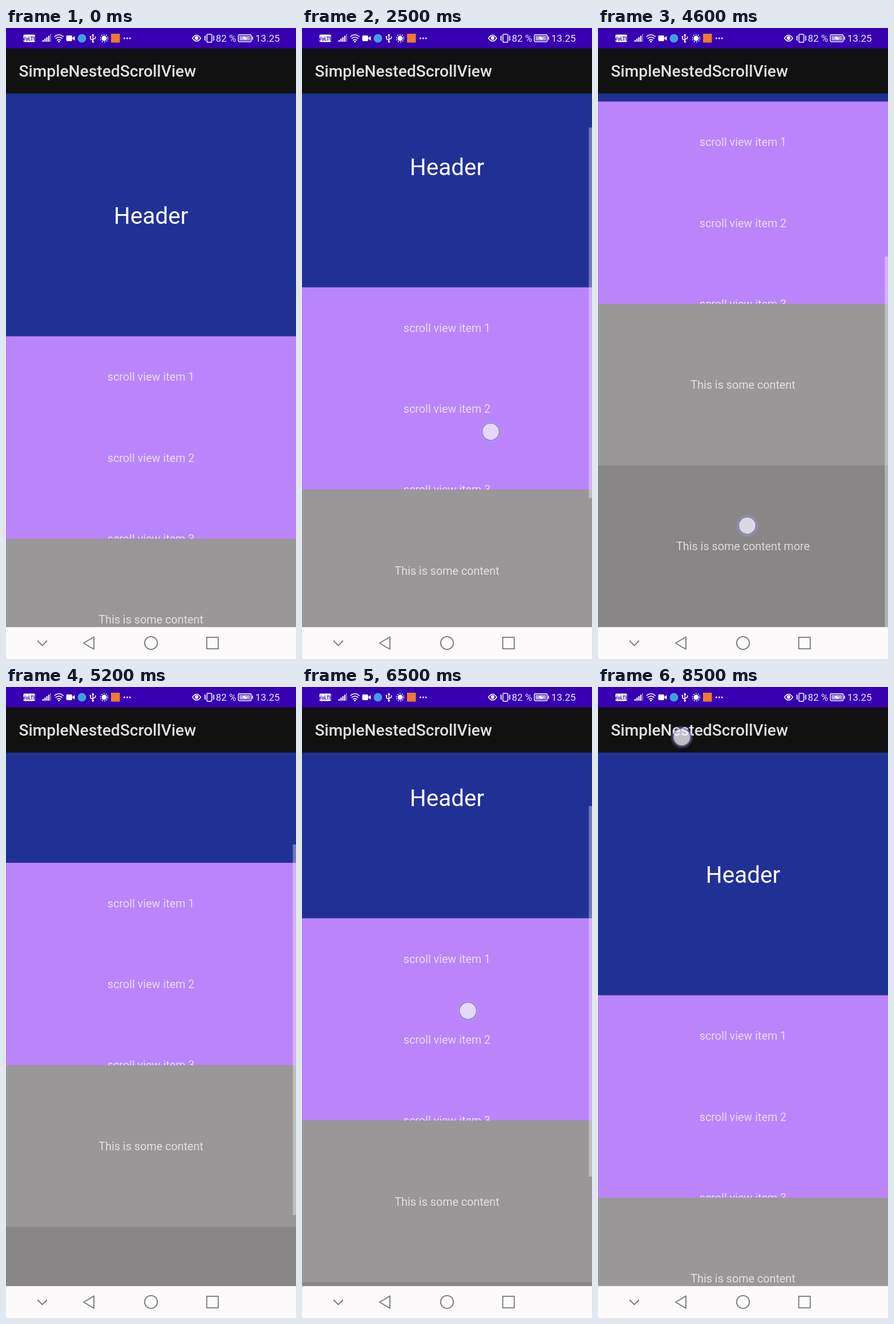
Recreate the animation shown at these times as an HTML page. Size 508 by 1102 pixels, loop 8.6 s.

```html
<!DOCTYPE html>
<html lang="en">
<head>
<meta charset="utf-8">
<title>SimpleNestedScrollView</title>
<style>
  html, body { margin: 0; width: 100%; height: 100%; overflow: hidden; background: #111; }
  svg { display: block; width: 100%; height: 100%; }
  text { font-family: Roboto, "Open Sans", sans-serif; fill: #fff; }
  .body { font-size: 19.76px; text-anchor: middle; fill-opacity: .7; }
  .status { font-size: 17px; fill-opacity: .92; }
  .line { fill: none; stroke: #fff; stroke-width: 1.5; }
  .nav { fill: none; stroke: #777; stroke-width: 1.8; }
</style>
</head>
<body>
<svg viewBox="0 0 508 1102">
  <g id="page">
    <rect y="100" width="508" height="438.3" fill="#203196"/>
    <text x="254" y="342" font-size="40.5" text-anchor="middle">Header</text>
    <rect y="538.3" width="508" height="354" fill="#ba85fb"/>
    <g class="body">
      <text x="254" y="616.3">scroll view item 1</text>
      <text x="254" y="757.5">scroll view item 2</text>
      <text x="254" y="898.7">scroll view item 3</text>
    </g>
    <rect y="891.8" width="508" height="283" fill="#999797"/>
    <rect y="1174" width="508" height="290" fill="#888686"/>
    <g class="body">
      <text x="254" y="1040">This is some content</text>
      <text x="254" y="1322.4">This is some content more</text>
    </g>
  </g>
  <rect id="bar" x="502.4" width="5.6" height="647" fill="#fff"/>

  <rect width="508" height="36" fill="#3700b3"/>
  <rect y="35.5" width="508" height="79" fill="#111"/>
  <text x="22.6" y="85.3" font-size="28.2" font-weight="500" fill-opacity=".87">SimpleNestedScrollView</text>

  <!-- status bar, left -->
  <g fill="#fff">
    <rect x="30.5" y="11.5" width="20.5" height="13" rx="2"/>
    <text x="40.8" y="21.5" font-size="8.5" font-weight="700" text-anchor="middle" style="fill:#3700b3">VoLTE</text>
    <path d="M64 24v-3h2.2v3zM67.3 24v-5.5h2.2v5.5zM70.6 24v-8h2.2v8zM73.9 24v-10.5h2.2v10.5z"/>
    <path d="M77.2 24v-13h1.6v13z" opacity=".5"/>
    <g class="line" stroke-linecap="round">
      <path d="M85 15q7.700-6.500 15.400 0M87.300 18.200q5.400-4.500 10.800 0M89.700 21.300q3-2.400 6 0"/>
    </g>
    <circle cx="92.700" cy="23.500" r="1.500"/>
    <rect x="105.500" y="13" width="10.500" height="10" rx="2"/>
    <path d="M116.500 17l4-3v8l-4-3z"/>
    <circle cx="133" cy="18" r="7.500" fill="#3f9de0"/>
    <path class="line" d="M152.300 12v12M148 15.500v3.500l4.300 2.500M156.600 14.500v3.500l-4.300 2"/>
    <path d="M149.800 13.500l2.500-3.500 2.500 3.500z"/>
    <circle cx="152.300" cy="24" r="1.800"/>
    <circle cx="148" cy="15.500" r="1.400"/>
    <circle cx="172" cy="18" r="4.500"/>
    <circle cx="172" cy="18" r="6.500" class="line" stroke-dasharray="2 2.080"/>
    <rect x="184" y="10" width="15.500" height="15.500" fill="#ee7a2e"/>
    <circle cx="207.500" cy="18" r="1.500"/><circle cx="212.300" cy="18" r="1.500"/><circle cx="217.100" cy="18" r="1.500"/>
  </g>

  <!-- status bar, right -->
  <path class="line" d="M326.500 17.800q7.300-10.500 14.600 0q-7.300 10.500-14.600 0z"/>
  <circle cx="333.800" cy="17.500" r="3.200" fill="#fff"/>
  <rect class="line" x="352" y="11" width="8.500" height="14" rx="1.500"/>
  <path class="line" d="M349.500 13.500l-1.500 2 1.500 2-1.500 2 1.500 2.500M363 13.500l1.500 2-1.500 2 1.500 2-1.500 2.500"/>
  <text class="status" x="367.500" y="23.800">82 %</text>
  <rect class="line" x="407" y="11.700" width="22.500" height="12.300" rx="2"/>
  <rect x="409" y="13.700" width="18.500" height="8.300" fill="#fff" opacity=".6"/>
  <path d="M431 15h1.700v5.500h-1.700zM412.500 18.500l6.500-4-.5 2.700h5.500l-6.500 4 .5-2.700z" fill="#fff"/>
  <text class="status" x="436.800" y="23.800">13.25</text>

  <rect y="1046.300" width="508" height="56" fill="#fcfafb"/>
  <g class="nav">
    <path d="M55 1070l8.500 8.500 8.500-8.500"/>
    <path d="M154 1063.500v21.500l-18-10.750z" stroke-linejoin="round"/>
    <circle cx="254" cy="1074" r="11.200"/>
    <rect x="351.700" y="1064.200" width="20" height="20"/>
  </g>

  <g id="touch">
    <circle r="20" fill="#b0a4e8" opacity=".13"/>
    <circle r="17.500" fill="#b0a4e8" opacity=".25"/>
    <circle r="14.800" fill="#fff" fill-opacity=".65" stroke="#7468bc" stroke-opacity=".7" stroke-width="1.300"/>
  </g>
</svg>
<script>
  const LOOP = 8600, STEP = 100;
  const [page, bar, touch] = ["page", "bar", "touch"].map(id => document.getElementById(id));

  // [time, scroll offset]
  const scroll = [[2040, 0], [2500, 85.5], [3500, 272], [4240, 410], [4650, 410],
    [5100, 285], [5500, 70], [5900, 103.5], [6500, 134.5], [7150, 0]];

  // each gesture: [time, x, y], lifted at the last time
  const gestures = [
    [[1900, 308, 806], [2040, 313, 796], [2500, 330.5, 705], [3500, 367, 508], [4400, 395, 335]],
    [[4600, 261.5, 869], [4700, 262, 878], [5100, 275, 1000]],
    [[5500, 299, 645], [5900, 297, 603], [6500, 290.7, 565.5], [7150, 296, 700], [7300, 297, 718]],
    [[8400, 147, 87.5], [8600, 147, 87.5]]
  ];

  function at(keys, t, col = 1) {
    if (t <= keys[0][0]) return keys[0][col];
    const i = keys.findIndex(k => k[0] > t);
    if (i < 0) return keys[keys.length - 1][col];
    const a = keys[i - 1], b = keys[i];
    return a[col] + (b[col] - a[col]) * (t - a[0]) / (b[0] - a[0]);
  }

  function draw(now) {
    const t = Math.floor(now % LOOP / STEP) * STEP;
    const s = at(scroll, t);
    page.setAttribute("transform", `translate(0 ${-s})`);

    bar.setAttribute("y", 114.5 + s * 932 / 1342);
    bar.setAttribute("opacity", t < 2100 ? 0 : at([[7600, .36], [7900, 0]], t));

    const g = gestures.find(k => t >= k[0][0] && t < k[k.length - 1][0]);
    touch.setAttribute("opacity", !g ? 0 : t === 8400 ? .7 : 1);
    if (g) touch.setAttribute("transform", `translate(${at(g, t)} ${at(g, t, 2)})`);
    requestAnimationFrame(() => draw(performance.now() - start));
  }

  const start = performance.now();
  draw(0);
</script>
</body>
</html>
```
